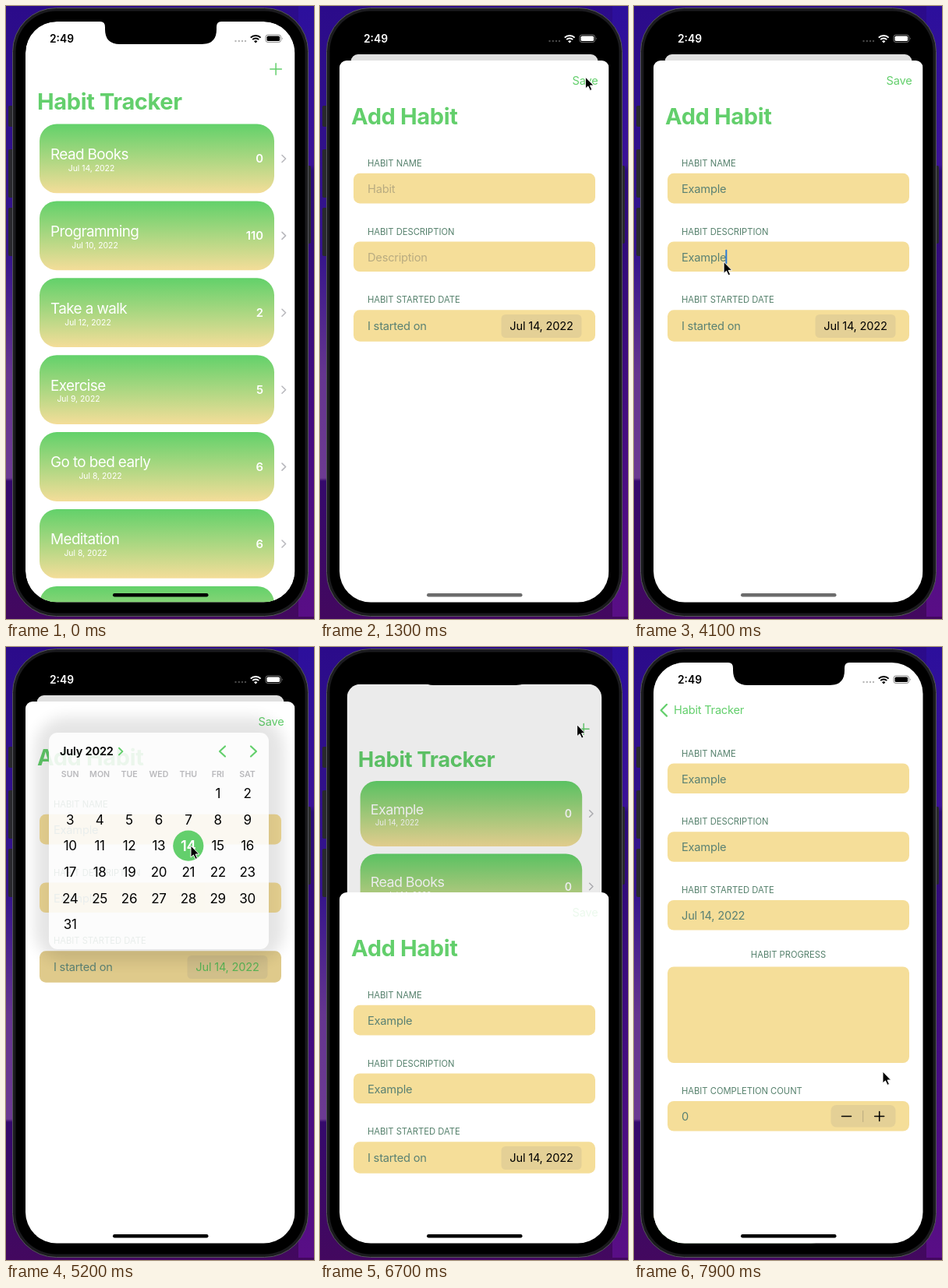
Recreate the animation shown at these times as an HTML page. Size 395x787 px, loop 8000 ms.

```html
<!DOCTYPE html>
<html lang="en">
<head>
<meta charset="utf-8">
<title>Habit Tracker</title>
<style>
html, body { margin: 0; width: 100%; height: 100%; overflow: hidden; background: #000; }
svg { display: block; width: 100vw; height: 100vh; }
text { font-family: Inter, "Open Sans", sans-serif; white-space: pre; }
</style>
</head>
<body>
<svg id="stage" viewBox="0 0 395 787" preserveAspectRatio="none">
  <defs>
    <linearGradient id="left" x2="0" y2="1">
      <stop offset="0" stop-color="#2b0b8a"/><stop offset=".4" stop-color="#35148c"/>
      <stop offset=".6" stop-color="#65358f"/><stop offset=".77" stop-color="#6c3a92"/>
      <stop offset=".775" stop-color="#35096c"/><stop offset="1" stop-color="#43085f"/>
    </linearGradient>
    <linearGradient id="right" x2="0" y2="1">
      <stop offset="0" stop-color="#2c0f9c"/><stop offset=".26" stop-color="#3b1296"/>
      <stop offset=".27" stop-color="#2a0b78"/><stop offset="1" stop-color="#590e86"/>
    </linearGradient>
    <linearGradient id="card" x2="0" y2="1">
      <stop offset="0" stop-color="#62d16a"/><stop offset="1" stop-color="#f4dd99"/>
    </linearGradient>
    <filter id="blur" x="-20%" y="-20%" width="140%" height="140%"><feGaussianBlur stdDeviation="9"/></filter>
    <clipPath id="screen"><rect x="25" y="20" width="345.5" height="745.5" rx="40"/></clipPath>
    <clipPath id="page"><rect id="pageEdge" x="25" y="20" width="345.5" height="745.5"/></clipPath>
  </defs>
  <rect width="395" height="787" fill="url(#left)"/>
  <rect x="375" width="20" height="784" fill="url(#right)"/>
  <g fill="#29292d">
    <rect x="3" y="128" width="8" height="27" rx="2"/>
    <rect x="3" y="184" width="8" height="62" rx="2"/>
    <rect x="3" y="259" width="8" height="62" rx="2"/>
    <rect x="385" y="205" width="6" height="100" rx="2"/>
  </g>
  <rect x="8.5" y="2.5" width="379" height="781" rx="56" fill="#1b1b1e" stroke="#55565b"/>
  <rect x="12.5" y="6.5" width="371" height="773" rx="52"/>
  <g clip-path="url(#screen)">
    <g id="list"><g clip-path="url(#page)">
      <rect x="25" y="20" width="346" height="746" fill="#fff"/>
      <g id="rows"></g>
      <g id="listHead"></g>
      <rect id="dim" x="25" y="20" width="346" height="746"/>
    </g></g>
    <g id="detail"><rect x="25" y="20" width="346" height="746" fill="#fff"/></g>
    <g id="sheet"><rect x="25" y="70" width="345.5" height="760" rx="9" fill="#fff"/></g>
    <g id="popover">
      <rect x="37" y="90" width="320" height="314" rx="40" opacity=".1" filter="url(#blur)"/>
      <rect x="55" y="110" width="282" height="278" rx="11" fill="#fff" opacity=".88"/>
    </g>
    <path d="M121 20q6 0 6 7v3q0 19 19 19h105q19 0 19-19v-3q0-7 6-7z"/>
    <rect id="home" x="137" y="754" width="122.5" height="4.5" rx="2.2"/>
  </g>
  <g id="status">
    <g fill="currentColor" opacity=".28">
      <circle cx="294.5" cy="45" r="1.2"/><circle cx="298.8" cy="45" r="1.2"/>
      <circle cx="303" cy="45" r="1.2"/><circle cx="307" cy="45" r="1.2"/>
    </g>
    <path d="M313.8 40.6a9 9 0 0 1 12.8 0M316.2 43.1a5.6 5.6 0 0 1 8 0" fill="none" stroke="currentColor" stroke-width="2"/>
    <path d="M320.2 47.6l-2.2-2.3a3.2 3.2 0 0 1 4.4 0z" fill="currentColor"/>
    <rect x="333" y="37" width="19.6" height="9.6" rx="3" fill="none" stroke="currentColor" opacity=".45"/>
    <rect x="334.5" y="38.5" width="16.6" height="6.6" rx="1.7" fill="currentColor"/>
    <path d="M354 40.2q1.6 1.5 0 3.2z" fill="currentColor" opacity=".5"/>
  </g>
  <path id="cursor" d="M0 0V15L3.4 11.9 6 17.4 8.5 16.3 6 11H10.6Z" stroke="#fff" stroke-width="1" stroke-linejoin="round"/>
</svg>
<script>
const $ = id => document.getElementById(id);
const GREEN = '#63cf6c', CREAM = '#f5de99', INK = '#5a8173', HINT = '#b8ab80';

function add(parent, tag, attrs) {
  const el = document.createElementNS('http://www.w3.org/2000/svg', tag);
  for (const k in attrs) el.setAttribute(k, attrs[k]);
  return parent.appendChild(el);
}
// cy is the middle of the capital letters
function text(parent, x, cy, str, size, fill, more) {
  const el = add(parent, 'text', { x, y: cy + size * .364, 'font-size': size, fill, ...more });
  el.textContent = str;
  return el;
}
const body = (g, x, cy, str, fill, more) => text(g, x, cy, str, 14.6, fill, { 'letter-spacing': -.2, ...more });
const label = (g, cy, str, more) => text(g, 61, cy, str, 11.2, '#55806c', more);
const box = (g, x, y, width, height, rx, fill) => add(g, 'rect', { x, y, width, height, rx, fill });
const line = (g, d, stroke, width) => add(g, 'path', { d, stroke, 'stroke-width': width, fill: 'none',
  'stroke-linecap': 'round', 'stroke-linejoin': 'round' });
const title = (g, cy, str) => text(g, 40, cy, str, 29, GREEN, { 'font-weight': 700, 'letter-spacing': -.36 });
const middle = { 'text-anchor': 'middle' }, end = { 'text-anchor': 'end' };

// Habit list
const head = $('listHead');
title(head, 122, 'Habit Tracker');
line(head, 'M338.8 81h14.6M346.1 73.7v14.6', GREEN, 1.5);
const rows = [
  ['Example', 14, 93, 0], ['Read Books', 14, 109.5, 0], ['Programming', 10, 114, 110], ['Take a walk', 12, 105, 2],
  ['Exercise', 9, 93, 5], ['Go to bed early', 8, 121, 6], ['Meditation', 8, 102, 6], ['', 8, 93, 0]
].map(([name, day, mid, count], i) => {
  const g = add($('rows'), 'g', { transform: `translate(0 ${i * 98.9})` });
  box(g, 43, 151.5, 301, 88.8, 22, 'url(#card)');
  text(g, 57, 190, name, 18.9, '#fff', { 'letter-spacing': -.6 });
  text(g, mid, 208, `Jul ${day}, 2022`, 10.4, '#fff', middle);
  text(g, 330, 196, count, 14.8, '#fff', { 'font-weight': 600, ...end });
  line(g, 'M354 191.5l4.6 4.5-4.6 4.5', '#b9b9be', 1.6);
  return g;
});

// Add sheet
const sheet = $('sheet');
const save = body(sheet, 356.5, 96, 'Save', GREEN, end);
title(sheet, 141, 'Add Habit');
const fields = [['HABIT NAME', 'Habit', 202], ['HABIT DESCRIPTION', 'Description', 289.7]].map(([name, hint, y]) => {
  label(sheet, y, name);
  box(sheet, 43, y + 12.8, 310, 38.6, 8, CREAM);
  return { hint, value: body(sheet, 61, y + 32.8, hint, HINT), caret: box(sheet, 61, y + 23, 2, 18.5, 1, '#2b7bd6') };
});
label(sheet, 377.4, 'HABIT STARTED DATE');
box(sheet, 43, 390.3, 310, 40.4, 8, CREAM);
const rowShade = box(sheet, 43, 390.3, 310, 40.4, 8, '#000');
body(sheet, 61, 411, 'I started on', INK);
box(sheet, 232.5, 396, 103, 30, 5.5, 'rgba(118,118,128,.13)');
const started = body(sheet, 284, 411, 'Jul 14, 2022', '#000', middle);

// Calendar
const pop = $('popover');
const col = i => 82.2 + i * 37.9;
body(pop, 69, 134, 'July 2022', '#000', { 'font-weight': 600 });
line(pop, 'M145 129.8l4.4 4.3-4.4 4.3', GREEN, 2);
line(pop, 'M281 127.5l-7 6.5 7 6.5M314 127.5l7 6.5-7 6.5', GREEN, 2.2);
'SUN MON TUE WED THU FRI SAT'.split(' ').forEach((d, i) =>
  text(pop, col(i), 163, d, 10.6, '#b9b9bc', { 'font-weight': 600, ...middle }));
add(pop, 'circle', { cx: col(4), cy: 255.2, r: 19.6, fill: GREEN });
for (let d = 1; d <= 31; d++) {
  const n = d + 4, on = d === 14;
  text(pop, col(n % 7), 188 + Math.floor(n / 7) * 33.6, d, on ? 18.5 : 17, on ? '#fff' : '#000',
    { 'font-weight': on ? 600 : 400, 'letter-spacing': -.3, ...middle });
}

// Detail page
const detail = $('detail');
line(detail, 'M42 73.8l-7.4 7.4 7.4 7.4', GREEN, 2.2);
body(detail, 51, 81, 'Habit Tracker', GREEN);
[['HABIT NAME', 'Example', 136.5], ['HABIT DESCRIPTION', 'Example', 224.2],
 ['HABIT STARTED DATE', 'Jul 14, 2022', 312], ['HABIT COMPLETION COUNT', '0', 570]].forEach(([name, value, y]) => {
  label(detail, y, name);
  box(detail, 43, y + 13, 310, 38.6, 8, CREAM);
  body(detail, 61, y + 32.7, value, INK);
});
label(detail, 394.5, 'HABIT PROGRESS', { x: 198, ...middle });
box(detail, 43, 410.5, 310, 123.5, 8, CREAM);
box(detail, 252.5, 588, 83, 28.5, 7, 'rgba(118,118,128,.13)');
line(detail, 'M293.7 595.5v14', 'rgba(60,60,67,.25)', 1);
line(detail, 'M266.5 602.4h12M308.7 602.4h12M314.7 596.4v12', '#000', 1.5);

text($('status'), 56, 42, '2:49', 13.8, 'currentColor', { 'font-weight': 600 });

const clamp = v => Math.max(0, Math.min(1, v));
const smooth = v => (v = clamp(v), v * v * (3 - 2 * v));
// Critically damped spring that rests after 600 ms
function spring(ms, rate) {
  if (ms <= 0) return 0;
  if (ms >= 600) return 1;
  const s = ms / 1000 * rate;
  return 1 - (1 + s) * Math.exp(-s);
}

// time, x, y of the pointer tip
const path = [
  [400, 380, 250], [600, 348, 86], [1250, 348, 86], [1700, 134, 229], [2650, 134, 229], [2900, 131, 323],
  [3750, 131, 323], [4000, 100, 322], [4600, 300, 406], [4800, 300, 406], [5200, 237, 255], [5450, 237, 255],
  [5750, 216, 503], [6050, 175, 267], [6400, 331, 98], [6650, 331, 98], [7250, 264, 185], [7450, 264, 185], [7900, 319, 545]
];
function pointer(t) {
  const i = path.findIndex(k => k[0] > t);
  if (i < 0) return path[path.length - 1].slice(1);
  const [a, b] = [path[Math.max(0, i - 1)], path[i]];
  const k = smooth((t - a[0]) / (b[0] - a[0] || 1));
  return [a[1] + (b[1] - a[1]) * k, a[2] + (b[2] - a[2]) * k];
}

function setField(f, count, focused) {
  f.value.textContent = count > 0 ? 'Example'.slice(0, count) : f.hint;
  f.value.setAttribute('fill', count > 0 ? INK : HINT);
  f.caret.setAttribute('x', 60 + (count > 0 ? f.value.getComputedTextLength() : 0));
  f.caret.setAttribute('opacity', focused ? 1 : 0);
}

function draw(t) {
  const up = spring(t - 600, 11.7) - spring(t - 6600, 12);
  const push = t >= 7850 ? 1 : spring(t - 7430, 14);
  const scale = 1 - .083 * up;
  $('list').setAttribute('transform',
    `translate(${25 + 14.6 * up - 104 * push} ${20 + 42 * up}) scale(${scale}) translate(-25 -20)`);
  $('pageEdge').setAttribute('rx', 40 - 30 * Math.min(1, up * 1.1));
  $('dim').setAttribute('opacity', .12 * up + .08 * push);
  const added = t >= 6600;
  $('rows').setAttribute('transform', `translate(0 ${added ? 0 : -98.9})`);
  rows[0].setAttribute('opacity', added ? 1 : 0);

  sheet.setAttribute('transform', `translate(0 ${717 * (1 - up)})`);
  save.setAttribute('opacity', t >= 6450 ? .12 : 1);
  setField(fields[0], Math.floor((t - 1800) / 100), t >= 1700 && t < 2800);
  setField(fields[1], Math.floor((t - 3000) * 7 / 600), t >= 2800 && t < 4700);

  const open = smooth((t - 4750) / 300) - smooth((t - 5750) / 250);
  const zoom = .3 + .7 * open;
  pop.setAttribute('transform', `translate(285 396) scale(${zoom}) translate(-285 -396)`);
  pop.setAttribute('opacity', open);
  rowShade.setAttribute('opacity', .09 * open);
  started.setAttribute('fill', t >= 4700 && t < 5800 ? '#58b354' : '#000');

  detail.setAttribute('transform', `translate(${346 * (1 - push)} 0)`);
  const shade = Math.round(255 * clamp((up - .72) / .27));
  $('status').setAttribute('color', `rgb(${shade},${shade},${shade})`);
  $('home').setAttribute('fill', t >= 700 && t < 4800 ? '#6c6c6c' : '#000');
  $('cursor').setAttribute('opacity', t >= 400 ? 1 : 0);
  $('cursor').setAttribute('transform', `translate(${pointer(t)})`);
}

function tick() {
  draw(performance.now() % 8000);
  requestAnimationFrame(tick);
}
tick();
</script>
</body>
</html>
```
